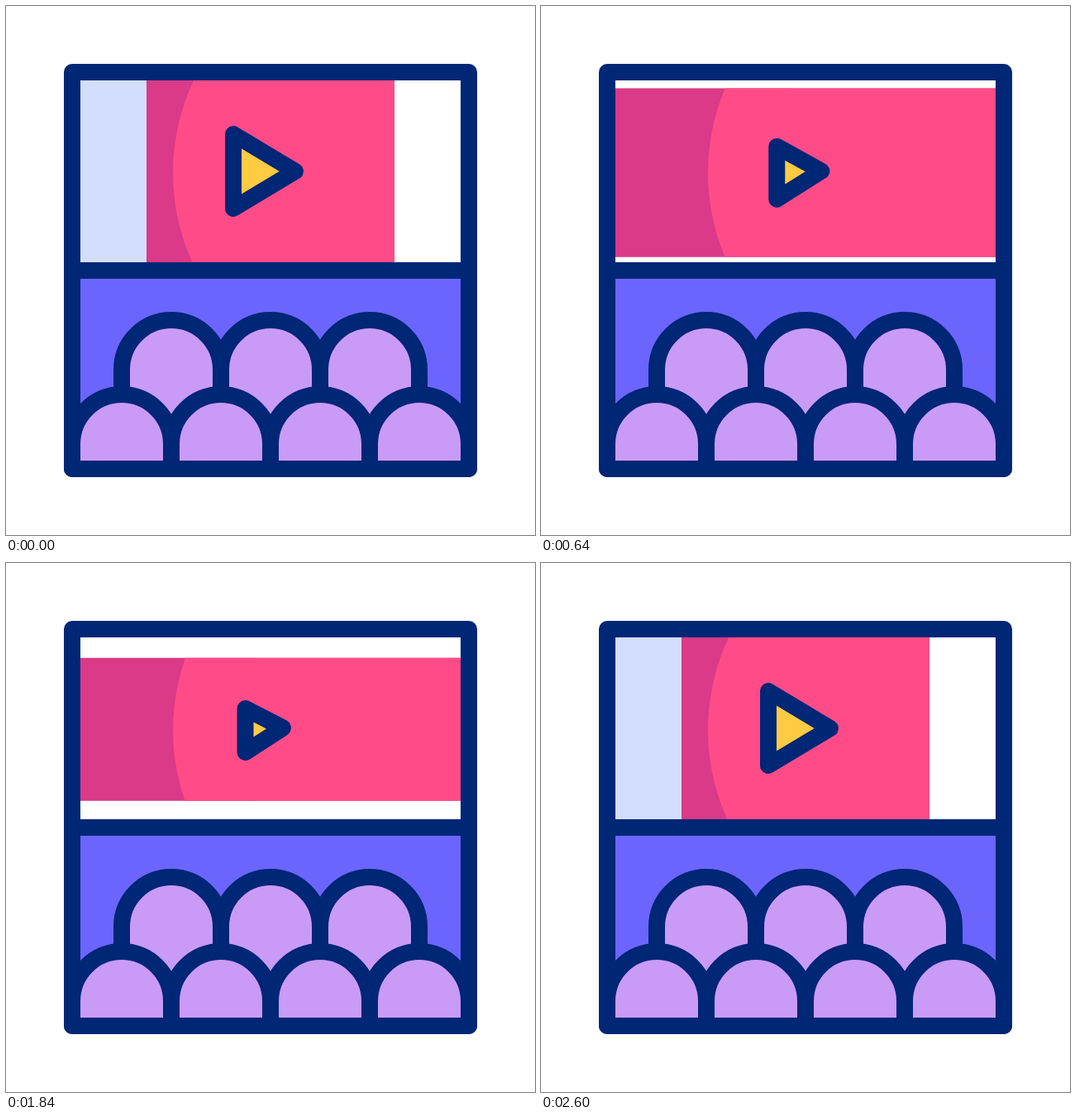
An HTML page with a canvas that plays this animation: 640x640 px, repeating every 3 s.

```html
<!DOCTYPE html>
<html lang="en">
<head>
<meta charset="utf-8">
<title>Cinema</title>
<style>
html, body { margin: 0; width: 100%; height: 100%; overflow: hidden; background: #fff; }
canvas { display: block; width: 100vw; height: 100vh; object-fit: contain; }
</style>
</head>
<body>
<canvas id="stage" width="640" height="640"></canvas>
<script>
const ctx = document.getElementById('stage').getContext('2d');
const LOOP = 3000, STEP = 40;
const NAVY = '#002676', PINK = '#ff4c88', SHADE = '#da3a87', BLUE = '#d3deff',
      WALL = '#6b65fd', SEAT = '#c99bf6', GOLD = '#ffcb42';

function ease(t, from, to) {
  const x = Math.min(1, Math.max(0, (t - from) / (to - from)));
  return x * x * (3 - 2 * x);
}

// Rises to 1 over the first span, falls back to 0 over the second.
const pulse = (t, a, b, c, d) => ease(t, a, b) - ease(t, c, d);
const mix = (a, b, p) => a + (b - a) * p;

function box(color, x1, y1, x2, y2) {
  ctx.fillStyle = color;
  ctx.fillRect(x1, y1, x2 - x1, y2 - y1);
}

function outline(fill) {
  ctx.fillStyle = fill;
  ctx.fill();
  ctx.stroke();
}

function seat(x, y) {
  ctx.beginPath();
  ctx.moveTo(x - 60, 560);
  ctx.lineTo(x - 60, y);
  ctx.arc(x, y, 60, Math.PI, 0);
  ctx.lineTo(x + 60, 560);
  outline(SEAT);
}

function screen(wide, flat) {
  const left = mix(170, 80, wide), right = mix(470, 560, wide);
  const top = mix(80, 126.6, flat), bottom = mix(324, 275.6, flat);

  ctx.save();
  ctx.beginPath();
  ctx.rect(80, 80, 480, 240);
  ctx.clip();
  box(BLUE, 80, 80, left, 320);
  ctx.beginPath();
  ctx.rect(left, top, right - left, bottom - top);
  ctx.clip();
  box(SHADE, 80, 80, 300, 330);
  ctx.beginPath();
  ctx.arc(464, 202, 262, 0, Math.PI * 2);
  ctx.fillStyle = PINK;
  ctx.fill();
  box(PINK, 300, 80, 560, 330);
  ctx.restore();
}

function playButton(p) {
  const x = mix(275, 289.5, p);
  ctx.beginPath();
  ctx.moveTo(x, mix(155, 176, p));
  ctx.lineTo(mix(350, 335, p), mix(200, 199.5, p));
  ctx.lineTo(x, mix(245, 229, p));
  ctx.closePath();
  outline(GOLD);
}

function draw(t) {
  box('#fff', 0, 0, 640, 640);
  ctx.lineWidth = 20;
  ctx.lineJoin = ctx.lineCap = 'round';
  ctx.strokeStyle = NAVY;

  screen(pulse(t, 80, 740, 2040, 2600), pulse(t, 480, 840, 1600, 2330));
  playButton(pulse(t, 280, 840, 2040, 2600));

  box(WALL, 80, 320, 560, 560);
  for (let x = 200; x <= 440; x += 120) seat(x, 440);
  for (let x = 140; x <= 500; x += 120) seat(x, 530);

  ctx.beginPath();
  ctx.rect(80, 80, 480, 480);
  ctx.moveTo(80, 320);
  ctx.lineTo(560, 320);
  ctx.stroke();
}

const start = performance.now();
function tick() {
  const t = (performance.now() - start) % LOOP;
  draw(Math.floor(t / STEP) * STEP);
  requestAnimationFrame(tick);
}
tick();
</script>
</body>
</html>
```
